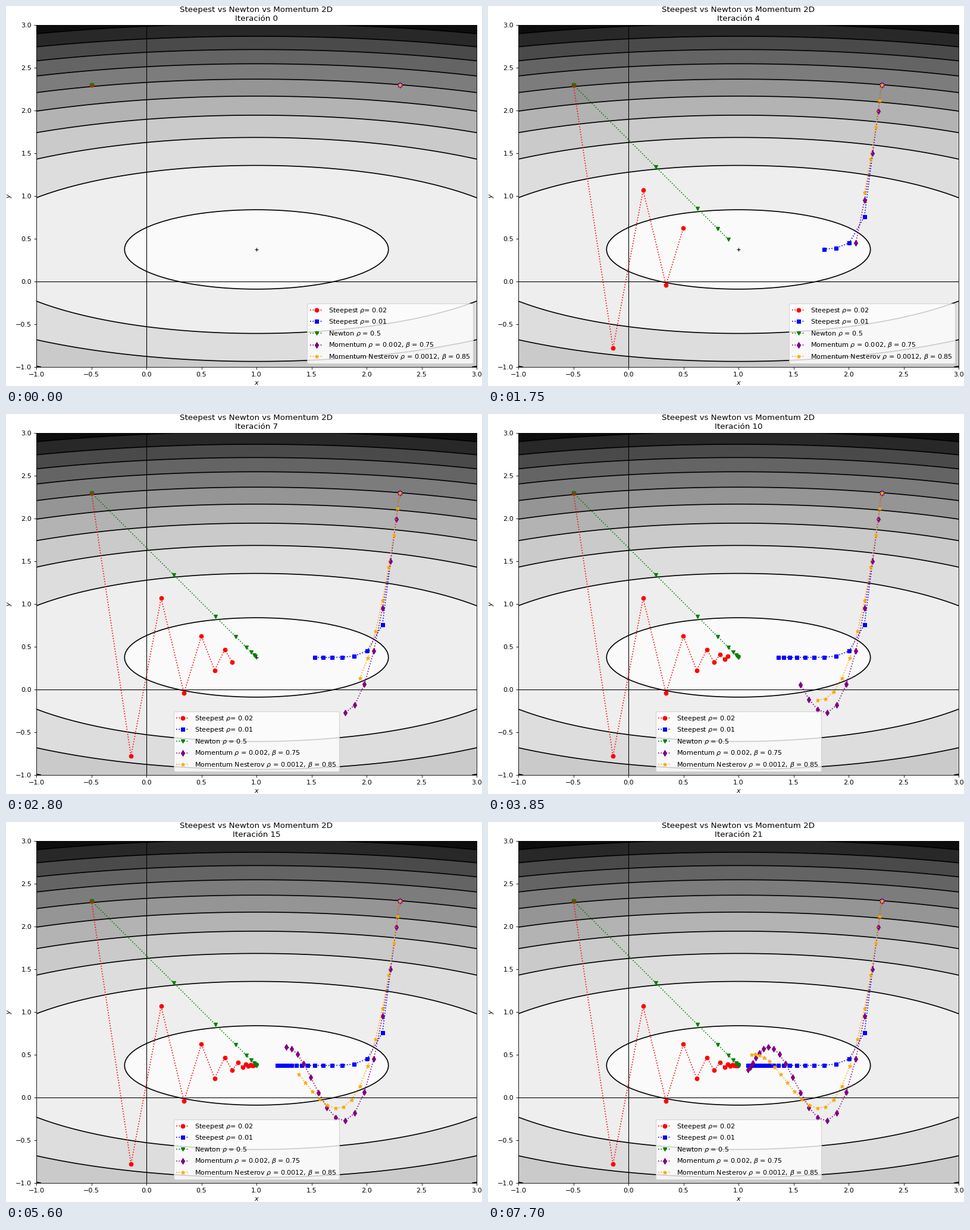
A matplotlib script for the animation above (8 s loop, 800 by 640 pixels).

```python
import numpy as np
import matplotlib.pyplot as plt
from matplotlib.animation import FuncAnimation

W, H, DPI = 800, 640, 80
TICK, STEP_MS, LOOP_MS = 50, 350, 8000
STEPS = 21

CENTER = np.array([1.0, 0.375])
HESSIAN = np.array([12.0, 80.0])
LEFT_START, RIGHT_START = (-0.5, 2.3), (2.3, 2.3)


def cost(x, y):
    return 6 * x**2 - 12 * x + 40 * y**2 - 30 * y + 3


def grad(p):
    return HESSIAN * (p - CENTER)


def descend(start, rate, beta=0.0, lookahead=False, newton=False):
    """Return all iterates of one optimiser, one point per row."""
    p, v = np.array(start), np.zeros(2)
    path = [p]
    for _ in range(STEPS):
        g = grad(p - beta * v if lookahead else p)
        if newton:
            g = g / HESSIAN
        v = beta * v + rate * g
        p = p - v
        path.append(p)
    return np.array(path)


METHODS = [
    (r"Steepest $\rho$= 0.02", "red", "o", descend(LEFT_START, 0.02)),
    (r"Steepest $\rho$= 0.01", "blue", "s", descend(RIGHT_START, 0.01)),
    (r"Newton $\rho$ = 0.5", "green", "v",
     descend(LEFT_START, 0.5, newton=True)),
    (r"Momentum $\rho$ = 0.002, $\beta$ = 0.75", "purple", "d",
     descend(RIGHT_START, 0.002, 0.75)),
    (r"Momentum Nesterov $\rho$ = 0.0012, $\beta$ = 0.85", "orange", "*",
     descend(RIGHT_START, 0.0012, 0.85, lookahead=True)),
]

plt.rcParams["font.family"] = "DejaVu Sans"
fig = plt.figure(figsize=(W / DPI, H / DPI), dpi=DPI)
ax = fig.add_axes([51 / W, 32 / H, 740 / W, 576 / H])

# Cost surface
x, y = np.meshgrid(np.linspace(-1, 3, 121), np.linspace(-1, 3, 121))
z = cost(x, y)
levels = np.arange(-30, 301, 30)
ax.contourf(x, y, z, levels, cmap="Greys")
ax.contour(x, y, z, levels, colors="black", linewidths=1.5)
ax.axhline(0, color="black", lw=1)
ax.axvline(0, color="black", lw=1)
ax.plot(*CENTER, "k+")

lines = [ax.plot([], [], ":", color=color, marker=marker, label=label)[0]
         for label, color, marker, _ in METHODS]

ax.set(xlim=(-1, 3), ylim=(-1, 3), xlabel="$x$", ylabel="$y$")
ticks = np.arange(-1, 3.1, 0.5)
ax.set_xticks(ticks)
ax.set_yticks(ticks)
title = ax.set_title("")
legend = ax.legend(loc="lower right")


def update(frame):
    n = max(0, frame * TICK // STEP_MS - 1)
    for line, (*_, path) in zip(lines, METHODS):
        line.set_data(path[:n + 1, 0], path[:n + 1, 1])
    title.set_text(f"Steepest vs Newton vs Momentum 2D\nIteración {n}")
    # The legend gives way once the momentum path comes near it
    legend.set_loc("lower right" if n < 7 else "lower center")
    return [*lines, title, legend]


anim = FuncAnimation(fig, update, frames=LOOP_MS // TICK, interval=TICK,
                     repeat=True, repeat_delay=0)
plt.show()
```
